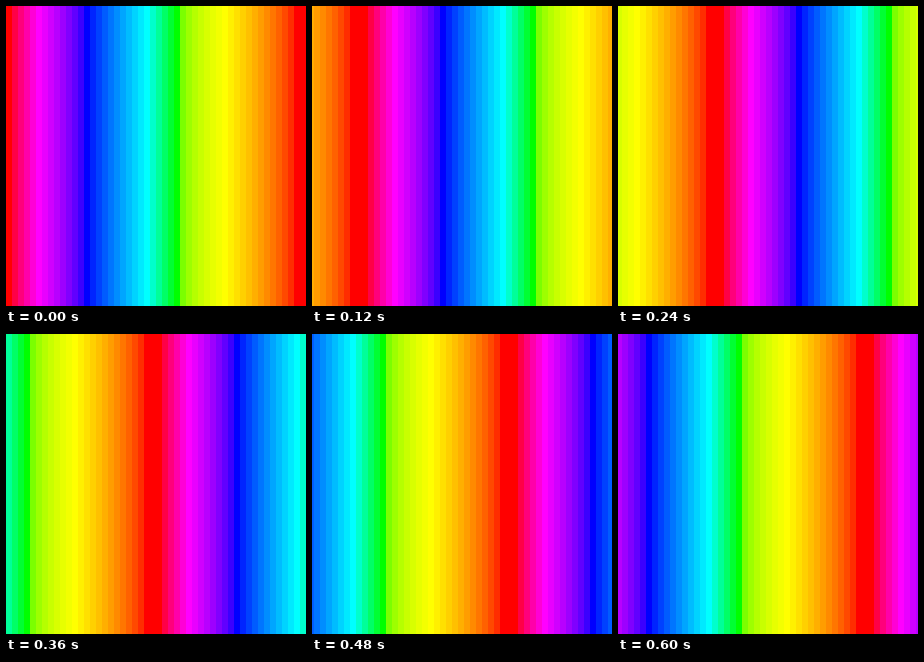
Animation of 300 by 300 pixels, one loop 660 ms. Source, as an HTML page:

```html
<!DOCTYPE html>
<html lang="en">
<head>
<meta charset="utf-8">
<title>Rainbow bars</title>
<style>
  html, body { margin: 0; width: 100%; height: 100%; overflow: hidden; }
  svg { display: block; width: 100%; height: 100%; }
</style>
</head>
<body>
<svg viewBox="0 0 300 300" shape-rendering="crispEdges">
  <g id="strip"></g>
</svg>
<script>
const SIZE = 300, BAR = 6, COUNT = SIZE / BAR;
const STEP_MS = 60, STEPS = 11, STEP_PX = 25;

// Pure hues by bar index; curve bends the fade towards the next hue
const hues = [
  { at: 0, rgb: [1, 0, 0], curve: 0.8 },
  { at: 5, rgb: [1, 0, 1], curve: 0.7 },
  { at: 13, rgb: [0, 0, 1], curve: 0.85 },
  { at: 23, rgb: [0, 1, 1], curve: 1 },
  { at: 28, rgb: [0, 1, 0], curve: 0.35 },
  { at: 36, rgb: [1, 1, 0], curve: 0.7 },
  { at: 48, rgb: [1, 0, 0], curve: 1 },
  { at: COUNT, rgb: [1, 0, 0] }
];

function barColor(index) {
  const next = hues.findIndex(hue => hue.at > index);
  const from = hues[next - 1], to = hues[next];
  const t = (index - from.at) / (to.at - from.at);
  const rgb = from.rgb.map((a, c) => {
    const level = a + (to.rgb[c] - a) * t;
    return Math.round(255 * level ** from.curve);
  });
  return `rgb(${rgb})`;
}

const strip = document.getElementById("strip");

// Two copies of the rainbow, so that it wraps around the stage
for (let i = -COUNT; i < COUNT; i++) {
  const bar = document.createElementNS("http://www.w3.org/2000/svg", "rect");
  bar.setAttribute("x", i * BAR);
  bar.setAttribute("width", BAR);
  bar.setAttribute("height", SIZE);
  bar.setAttribute("fill", barColor((i + COUNT) % COUNT));
  strip.append(bar);
}

function render(ms) {
  const step = Math.floor(ms / STEP_MS) % STEPS;
  strip.setAttribute("transform", `translate(${step * STEP_PX} 0)`);
}

const start = performance.now();
function tick() {
  render(performance.now() - start);
  requestAnimationFrame(tick);
}
tick();
</script>
</body>
</html>
```
